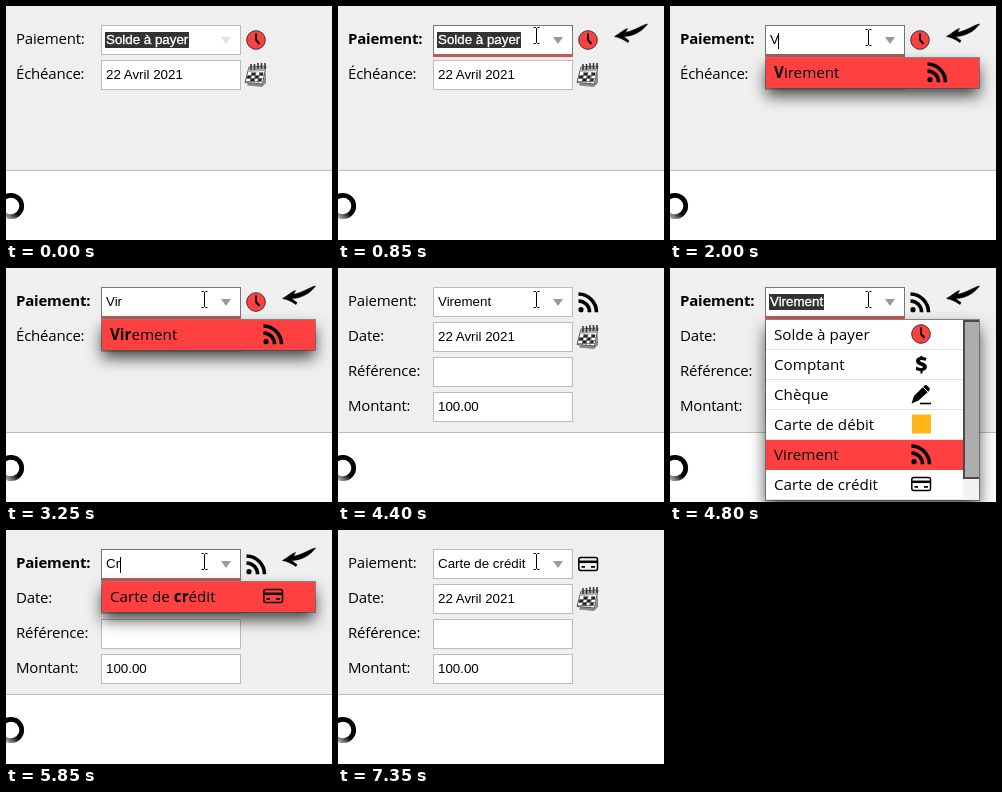
These frames come from a looping animation (326 by 234 pixels, 8 s). An HTML page:

```html
<!DOCTYPE html>
<html lang="fr">
<head>
<meta charset="utf-8">
<title>Mode de paiement</title>
<style>
  html, body { margin: 0; width: 326px; height: 234px; overflow: hidden; background: #fff; }
  #stage { position: relative; width: 326px; height: 234px; overflow: hidden; color: #000; }
  #stage * { box-sizing: border-box; }
  .abs, .label, .input, .list, .icon { position: absolute; }
  #panel { left: 0; top: 0; width: 326px; height: 165px; background: #efefef; border-bottom: 1px solid #bcbcbc; }
  .label { left: 10px; height: 30px; font: 15px/30px "Open Sans", "Noto Sans", sans-serif; letter-spacing: -.2px; white-space: nowrap; }
  .input { left: 95px; width: 140px; height: 30px; padding-left: 4px; background: #fff; border: 1px solid #bcbcbc;
    font: 13.333px/28px "Liberation Sans", Arial, sans-serif; white-space: pre; }
  .focus .label.main { font-weight: 700; }
  .focus .input.main { border-color: #777; }
  .input.main span { display: inline-block; height: 16px; line-height: 16px; vertical-align: middle; padding: 0 1px; margin-left: -1px; }
  .picked .input.main span { background: #333; color: #fff; -webkit-text-stroke: .35px #fff; }
  #caret { display: none; left: 0; top: 7px; width: 1px; height: 16px; background: #000; }
  #underline { left: 95px; top: 49px; width: 140px; height: 2px; background: #f04444; }
  #drop { left: 215px; top: 31px; border: solid transparent; border-width: 7px 5px 0; border-top-color: #e0e0e0; }
  .hover #drop { border-top-color: #999; }
  #underline, #arrow { visibility: hidden; }
  .focus #underline, .focus #arrow { visibility: visible; }
  .paid { display: none; }
  .paying .paid { display: block; }
  .icon { width: 24px; height: 24px; overflow: visible; }
  .list { left: 95px; top: 51px; width: 215px; max-height: 182px; overflow: hidden; background: #fff;
    border: 1px solid rgba(60, 60, 60, .55); background-clip: padding-box; box-shadow: 0 8px 15px -1px rgba(0, 0, 0, .7); }
  .list.scroll { padding-right: 16px; }
  .row { position: relative; height: 30px; padding-left: 8px; border-bottom: 1px solid #e2e2e2;
    font: 15.2px/28px "Open Sans", "Noto Sans", sans-serif; white-space: nowrap; }
  .row.on { background: #ff4040; border-color: #ff4040; }
  .row .icon { right: 30px; top: 2px; }
  .bar { right: 0; top: 0; width: 16px; height: 180px; background: #f2f2f2; }
  .bar::after { content: ""; position: absolute; left: 0; top: 0; width: 16px; height: 155px; background: #adadad; border: 2px solid #4a4a4a; }
</style>
</head>
<body>
<div id="stage">
  <div id="panel" class="abs"></div>

  <div class="label main" style="top:17px">Paiement:</div>
  <div class="input main" style="top:19px"><span id="value"></span><i id="caret" class="abs"></i></div>
  <div id="underline" class="abs"></div>
  <div id="drop" class="abs"></div>
  <svg id="badge" class="icon" style="left:238px;top:22px" viewBox="0 0 24 24"></svg>

  <div class="label" id="dateLabel" style="top:52px"></div>
  <div class="input" style="top:54px">22 Avril 2021</div>
  <svg class="icon" style="left:238px;top:57px" viewBox="0 0 24 24">
    <path d="M4 20 19 21 22 8V20L18 24 3 22.5Z" fill="#888"/>
    <path d="M5 4 22 3 18.500 21 1 19.500Z" fill="#fff" stroke="#555"/>
    <path d="M5 4.500 21.500 3.500 20.500 8 4 9Z" fill="#aaa"/>
    <path d="M7 1V7M10.500 1V7M14 0V6M17.500 0V6M21 0V6" stroke="#333" stroke-width="1.500"/>
    <path d="M8 9.500h4l-.7 3h-4zM15.500 9.500h4l-.7 3h-4zM3.500 12.500h4l-.7 3h-4zM11 12.500h4l-.7 3h-4zM6.800 15.500h4l-.7 3h-4zM14 15.500h4l-.7 3h-4z" fill="#222"/>
    <path d="M3.500 12.500H20M2.500 15.500H19.500M2 18.500H18.500M8 9 6 20M12 9 10 20M16 9 14 20" stroke="#666" stroke-width=".8"/>
  </svg>

  <div class="paid">
    <div class="label" style="top:87px">Référence:</div>
    <div class="input" style="top:89px"></div>
    <div class="label" style="top:122px">Montant:</div>
    <div class="input" style="top:124px">100.00</div>
  </div>

  <svg class="abs" style="left:0;top:0" width="326" height="234">
    <defs>
      <linearGradient id="gloss" x1="0" y1="1" x2=".65" y2=".35">
        <stop offset=".1" stop-color="#ccc"/><stop offset=".75" stop-color="#000"/>
      </linearGradient>
    </defs>
    <circle cx="5" cy="200" r="10.700" fill="none" stroke="url(#gloss)" stroke-width="4.800"/>
    <path id="arrow" d="M309.500 18C304 19 298 24 287.500 26.500L289.500 22.500C285 24 281 28 276.500 30.500 281 31.500 285 33 290 36.500L291 34.500C288.500 33 287 31.500 285.500 30.500 294 30.500 304 26 309.500 18Z"
      stroke="#000" stroke-width=".6" stroke-linejoin="round"/>
  </svg>

  <div id="list" class="list"></div>

  <svg class="abs" style="left:0;top:0" width="326" height="234">
    <path id="pointer" d="M0 0V16L3.800 12.600 6.400 18.500 9 17.400 6.400 11.600H11.500Z" fill="#fff" stroke="#000"/>
    <path id="beam" d="M-3-8H-1L0-7 1-8H3M0-7V7M-3 8H-1L0 7 1 8H3" fill="none" stroke="#000"/>
  </svg>
</div>

<script>
const LOOP = 8000, TICK = 50;
const $ = id => document.getElementById(id);

const icons = {
  clock: '<circle cx="12" cy="12" r="9.300" fill="#ff4040" stroke="#333"/><path d="M12 5.500V12L15.500 16" fill="none" stroke="#000" stroke-width="2"/>',
  dollar: '<text x="12.500" y="19.500" text-anchor="middle" font-family="Open Sans, sans-serif" font-weight="800" font-size="21">$</text>',
  pen: '<path d="M2.500 21.500 5 14 15.500 3.500Q17 2.500 18.500 4L20.500 6Q21.500 7.500 20 9L9.500 18.500Z"/><path d="M14 5 19 10" stroke="#fff"/><path d="M11 21.500H22" stroke="#000" stroke-width="1.600"/>',
  debit: '<rect x="3" y="2.500" width="19" height="19" fill="#fdb515"/>',
  rss: '<circle cx="5" cy="19.700" r="2.600"/><path d="M2.500 11A11 11 0 0 1 13.500 22.300M2.500 4A18.300 18.300 0 0 1 20.500 22.300" fill="none" stroke="#000" stroke-width="3.600"/>',
  card: '<rect x="2.800" y="5.500" width="18.700" height="13" rx="2" fill="none" stroke="#000" stroke-width="1.500"/><path d="M3 9.800H21.500" stroke="#000" stroke-width="2.500"/><path d="M5.500 14.800H9M15 14.800H19" stroke="#000" stroke-width="1.800"/>',
  gift: '<path d="M3 7H21V11H3ZM4.500 12H19.500V21H4.500Z"/><path d="M12 7V21" stroke="#fff" stroke-width="1.500"/><path d="M12 7C5 6 7 1 12 7 17 1 19 6 12 7" fill="none" stroke="#000" stroke-width="1.500"/>'
};

const modes = [
  ['Solde à payer', 'clock'], ['Comptant', 'dollar'], ['Chèque', 'pen'], ['Carte de débit', 'debit'],
  ['Virement', 'rss'], ['Carte de crédit', 'card'], ['Carte-cadeau', 'gift']
];
const SOLDE = 0, VIREMENT = 4, CREDIT = 5;

// Each step keeps the earlier values it does not set.
const steps = [
  [0, { mode: SOLDE, picked: true, focus: false, hover: false, open: false, typed: '', caret: false }],
  [700, { hover: true }],
  [850, { focus: true }],
  [950, { open: true }],
  [2000, { typed: 'V', picked: false, caret: true }],
  [2350, { typed: 'Vi' }],
  [2700, { typed: 'Vir' }],
  [3250, { caret: false }],
  [3500, { mode: VIREMENT, typed: '', open: false, focus: false }],
  [4700, { focus: true, picked: true }],
  [4800, { open: true }],
  [5500, { typed: 'C', picked: false, caret: true }],
  [5850, { typed: 'Cr' }],
  [6100, { typed: 'Cré' }],
  [6500, { typed: 'Créd' }],
  [7050, { caret: false }],
  [7350, { mode: CREDIT, typed: '', open: false, focus: false }]
];

// time, x, y of the mouse
const path = [
  [100, 309, 88], [150, 282, 48], [200, 255, 18], [400, 255, 18], [500, 240, 9],
  [600, 218, 13], [700, 199, 27], [750, 198, 29], [1150, 198, 29], [1300, 198, 31]
];

const svg = name => `<svg class="icon" viewBox="0 0 24 24">${icons[name]}</svg>`;

function listHtml({ mode, typed }) {
  const found = modes.filter(([name]) => name.toLowerCase().includes(typed.toLowerCase()));
  const current = typed ? found[0] : modes[mode];
  const rows = found.map(item => {
    const name = typed ? item[0].replace(new RegExp(typed, 'gi'), '<b>$&</b>') : item[0];
    return `<div class="row${item === current ? ' on' : ''}">${name}${svg(item[1])}</div>`;
  });
  const scroll = found.length > 6;
  $('list').classList.toggle('scroll', scroll);
  return rows.join('') + (scroll ? '<div class="abs bar"></div>' : '');
}

function show(state) {
  const { mode, typed, picked, focus, hover, open, caret } = state;
  const flags = { picked, focus, hover, paying: mode !== SOLDE };
  for (const name in flags) $('stage').classList.toggle(name, flags[name]);
  $('value').textContent = typed || modes[mode][0];
  $('badge').innerHTML = icons[modes[mode][1]];
  $('dateLabel').textContent = mode === SOLDE ? 'Échéance:' : 'Date:';
  $('list').style.display = open ? 'block' : 'none';
  if (open) $('list').innerHTML = listHtml(state);
  $('caret').style.display = caret ? 'block' : 'none';
  $('caret').style.left = Math.floor($('value').offsetLeft + $('value').getBoundingClientRect().width - 1) + 'px';
}

function mouseAt(t) {
  const next = path.findIndex(p => p[0] > t);
  if (next < 0) return path[path.length - 1].slice(1);
  const [t0, x0, y0] = path[next - 1], [t1, x1, y1] = path[next];
  const k = (t - t0) / (t1 - t0);
  return [x0 + (x1 - x0) * k, y0 + (y1 - y0) * k].map(Math.round);
}

function moveMouse(t) {
  const visible = t >= 100 && (t < 3500 || t >= 4400);
  const inField = t >= 700;
  $('pointer').style.display = visible && !inField ? '' : 'none';
  $('beam').style.display = visible && inField ? '' : 'none';
  if (!visible) return;
  const [x, y] = mouseAt(t);
  $(inField ? 'beam' : 'pointer').setAttribute('transform', `translate(${x + .5} ${y + .5})`);
}

const start = performance.now();
let shown = -1;
function draw() {
  const t = Math.floor((performance.now() - start) % LOOP / TICK) * TICK;
  const past = steps.filter(([at]) => at <= t);
  if (past.length !== shown) {
    shown = past.length;
    show(Object.assign({}, ...past.map(step => step[1])));
  }
  moveMouse(t);
  requestAnimationFrame(draw);
}
draw();
</script>
</body>
</html>
```
